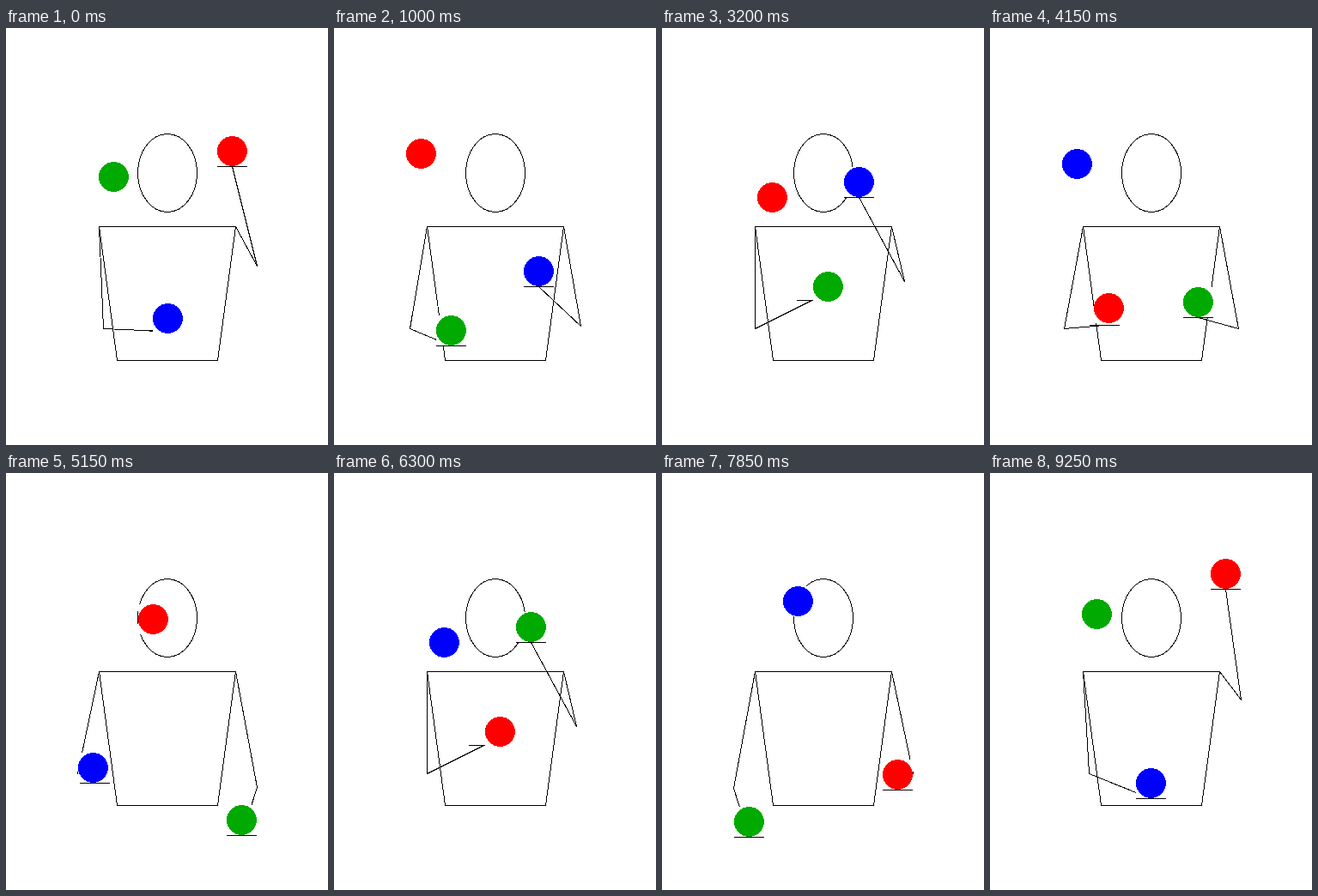
Write an HTML page that moves like this. It is 375 px wide and 486 px high and loops after 9.3 s.

```html
<!DOCTYPE html>
<html lang="en">
<head>
<meta charset="utf-8">
<title>Three ball juggling</title>
<style>
  html, body { margin: 0; width: 100%; height: 100%; overflow: hidden; background: #fff; }
  svg { display: block; width: 100%; height: 100%; shape-rendering: crispEdges; }
  .line { fill: none; stroke: #000; stroke-width: 1; }
</style>
</head>
<body>
<svg viewBox="0 0 375 486">
  <ellipse class="line" cx="188" cy="169" rx="34.5" ry="45.5"/>
  <path class="line" d="M108.5 231.5H267.5L246.5 387.5H129.5Z"/>
  <path class="line" id="left"/>
  <path class="line" id="right"/>
  <g id="balls"></g>
</svg>
<script>
const STEP = 50, FRAMES = 186, SIZE = 35;
const BEATS_PER_FRAME = 3 / 31;
const SWING = 279.8, GRAVITY = 92.6;

// Places where a ball is caught or thrown (top left corner of the ball)
const outer = [84.1, 335.6], inner = [119.85, 335.6], middle = [170.3, 335.6];
const crossHigh = [84.1, 109.4], reach = [221.9, 266];
const low = [257.3, 387.8], high = [257.3, 109.4];

// Segments: [beats, end point, arc height factor]
const dip = to => [1, to, SWING];
const lift = to => [1, to, -SWING];
const toss = (beats, to) => [beats, to, -GRAVITY * beats * beats];

const ballPath = [
  dip(crossHigh), toss(2, outer), dip(outer), toss(3, inner), dip(inner),
  toss(3, middle), dip(middle), toss(2, reach), dip(low), lift(low), dip(high), lift(high)
];
const leftPath = [lift(inner), dip(inner), lift(outer), dip(outer), lift(middle), dip(middle)];
const rightPath = [dip(crossHigh), lift(reach), dip(low), lift(low), dip(high), lift(high)];

function locate(path, beat) {
  const total = path.reduce((sum, seg) => sum + seg[0], 0);
  let from = path[path.length - 1][1];
  beat %= total;
  for (const [beats, to, arc] of path) {
    if (beat < beats) {
      const u = beat / beats;
      return [
        Math.floor(from[0] + (to[0] - from[0]) * u),
        Math.floor(from[1] + (to[1] - from[1]) * u + arc * u * (1 - u))
      ];
    }
    beat -= beats;
    from = to;
  }
}

const mirror = x => 376 - x;

function elbow(x, y) {
  const raised = Math.min(350, 196.5 + y / 2);
  return [
    Math.round(Math.max(83, 14.3 + 0.537 * x)) + 0.5,
    Math.round(Math.max(raised, 154.5 + y / 2)) + 0.5
  ];
}

function armPath([x, y], isRight) {
  const wx = x + SIZE / 2, wy = y + SIZE + 0.5;
  let [ex, ey] = elbow(isRight ? mirror(wx) : wx, wy);
  if (isRight) ex = mirror(ex);
  const shoulder = isRight ? 267.5 : 108.5;
  return `M${shoulder} 231.5L${ex} ${ey}L${wx} ${wy}M${x} ${wy}h${SIZE}`;
}

const left = document.getElementById('left');
const right = document.getElementById('right');
const group = document.getElementById('balls');

function add(parent, name, attrs) {
  const el = document.createElementNS(group.namespaceURI, name);
  for (const key in attrs) el.setAttribute(key, attrs[key]);
  return parent.appendChild(el);
}

// Each ball sits on an opaque white tile
const balls = ['#f00', '#0a0', '#00f'].map(fill => {
  const g = add(group, 'g', {});
  add(g, 'rect', { width: SIZE, height: SIZE, fill: '#fff' });
  add(g, 'circle', { cx: SIZE / 2, cy: SIZE / 2, r: SIZE / 2, fill });
  return g;
});

function draw(ms) {
  const frame = Math.floor(ms / STEP) % FRAMES;
  const beat = (frame + 2 / 3) * BEATS_PER_FRAME;
  left.setAttribute('d', armPath(locate(leftPath, beat), false));
  right.setAttribute('d', armPath(locate(rightPath, beat), true));
  balls.forEach((g, i) => {
    g.setAttribute('transform', `translate(${locate(ballPath, beat + 6 * i)})`);
  });
}

const start = performance.now();
function tick() {
  draw(performance.now() - start);
  requestAnimationFrame(tick);
}
tick();
</script>
</body>
</html>
```
